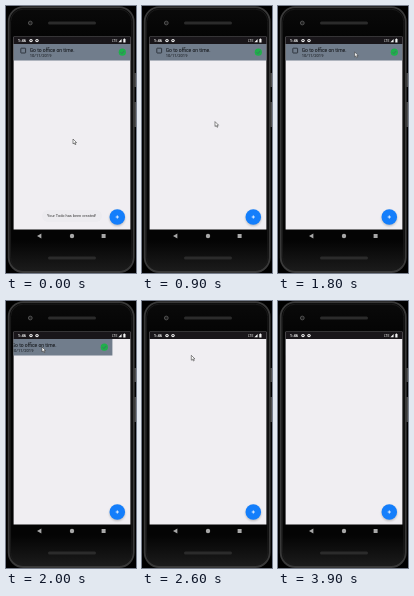
An HTML page that plays this animation: 130x267 px, repeating every 4.3 s.

```html
<!DOCTYPE html>
<html lang="en">
<head>
<meta charset="utf-8">
<title>Swipe to delete a todo</title>
<style>
  html, body { margin: 0; width: 100%; height: 100%; overflow: hidden; background: #000; }
  svg { display: block; width: 130px; height: 267px; font-family: Roboto, sans-serif; }
</style>
</head>
<body>
<svg viewBox="0 0 130 267">
  <defs>
    <clipPath id="screen"><rect x="7.6" y="30.8" width="116.8" height="192.8"/></clipPath>
    <filter id="soft" x="-50%" y="-50%" width="200%" height="200%"><feGaussianBlur stdDeviation="1.2"/></filter>
    <linearGradient id="body" x2="0" y2="1">
      <stop offset="0" stop-color="#0a0a0a"/>
      <stop offset=".12" stop-color="#040404"/>
      <stop offset=".88" stop-color="#040404"/>
      <stop offset="1" stop-color="#1c1c1c"/>
    </linearGradient>
  </defs>

  <!-- phone body -->
  <rect width="130" height="267" fill="#000"/>
  <rect x="2.7" y="1.2" width="125" height="264.8" rx="14.5" fill="url(#body)" stroke="#393939" stroke-width="1.8"/>
  <rect x="4.6" y="3.2" width="121.2" height="260.8" rx="12.5" fill="none" stroke="#1a1a1a"/>
  <path d="M129.2 67v14M129.2 96v25" stroke="#707070"/>
  <g fill="#2b2b2b">
    <rect x="42" y="15.4" width="48" height="3" rx="1.5"/>
    <rect x="42" y="250.6" width="48" height="3" rx="1.5"/>
  </g>
  <circle cx="24.3" cy="17" r="1.9" fill="#202020" stroke="#555" stroke-width=".9"/>

  <g clip-path="url(#screen)">
    <rect x="7" y="30" width="118" height="195" fill="#f0eef2"/>

    <g id="item">
      <rect x="7.6" y="38" width="116.8" height="16.5" fill="#717d8c"/>
      <rect x="14.8" y="42.2" width="4.8" height="4.8" rx=".5" fill="none" stroke="#20252c" stroke-width=".8"/>
      <text x="23.7" y="45.8" font-size="5" fill="#08090b">Go to office on time.</text>
      <text x="23.7" y="51.2" font-size="4.1" fill="#15181c">10/11/2019</text>
      <circle cx="116.3" cy="46.2" r="3.6" fill="#1fb04b"/>
      <path d="M114.6 46.3l1.3 1.3 2.3-2.6" fill="none" stroke="#3f6f63" stroke-width=".9"/>
    </g>

    <g id="toast">
      <rect x="36" y="204" width="60" height="12" rx="6" fill="#ecebef"/>
      <text x="41" y="211.4" font-size="3.9" fill="#333">Your Todo has been created!</text>
    </g>

    <circle cx="111.3" cy="212.2" r="7.8" fill="#000" opacity=".22" filter="url(#soft)"/>
    <circle cx="111.3" cy="211" r="7.8" fill="#147efb"/>
    <path d="M109.7 211h3.2M111.3 209.4v3.2" stroke="#fff" stroke-width=".8"/>

    <!-- status bar -->
    <rect x="7" y="30" width="118" height="8" fill="#19161a"/>
    <g fill="#f2f2f2">
      <text x="11.8" y="36.2" font-size="4.2" font-weight="700">1:46</text>
      <circle cx="25" cy="34.6" r="1.7"/>
      <circle cx="31" cy="34.6" r="1.7"/>
      <text x="106" y="36" font-size="3.4">LTE</text>
      <path d="M112.4 36.3h3.2v-3.4zM117.3 33h.6v-.5h1v.5h.6v3.4h-2.2z"/>
    </g>
    <path d="M24.3 34.6h1.4M30.3 34.6h1.4" stroke="#19161a" stroke-width=".9"/>
  </g>

  <!-- navigation bar -->
  <g fill="#a8a8a8">
    <path d="M31 230l4.4-2.6v5.2z"/>
    <circle cx="66" cy="230" r="2.2"/>
    <rect x="95.6" y="228" width="4" height="4"/>
  </g>

  <path id="cursor" d="M0 0v4.9l1.2-1 .8 1.8.9-.4-.8-1.7h1.5z" fill="#fff" stroke="#333" stroke-width=".55"/>
</svg>
<script>
  const LOOP = 4300, STEP = 100;
  const [item, toast, cursor] = ["item", "toast", "cursor"].map(id => document.getElementById(id));

  // Keys are [time, value, ...]
  const cursorKeys = [
    [800, 67, 133], [1300, 97, 46], [1700, 97, 46], [2000, 36, 46], [2500, 36, 46],
    [2600, 49.3, 54.3], [3000, 86.3, 114.7], [3500, 86.3, 114.7], [3800, 70, 251]
  ];
  const itemKeys = [[1800, 0], [2000, -18], [2200, -117]];
  const toastKeys = [[200, 1], [800, 0]];

  function sample(keys, t) {
    const next = keys.findIndex(key => key[0] > t);
    if (next === 0) return keys[0].slice(1);
    if (next < 0) return keys.at(-1).slice(1);
    const a = keys[next - 1], b = keys[next];
    const p = (t - a[0]) / (b[0] - a[0]);
    return a.slice(1).map((v, i) => v + (b[i + 1] - v) * p);
  }

  function draw() {
    const t = Math.floor(performance.now() % LOOP / STEP) * STEP;
    cursor.setAttribute("transform", `translate(${sample(cursorKeys, t)})`);
    cursor.setAttribute("visibility", t < 3900 ? "visible" : "hidden");
    item.setAttribute("transform", `translate(${sample(itemKeys, t)})`);
    toast.setAttribute("opacity", sample(toastKeys, t)[0]);
    requestAnimationFrame(draw);
  }
  draw();
</script>
</body>
</html>
```
